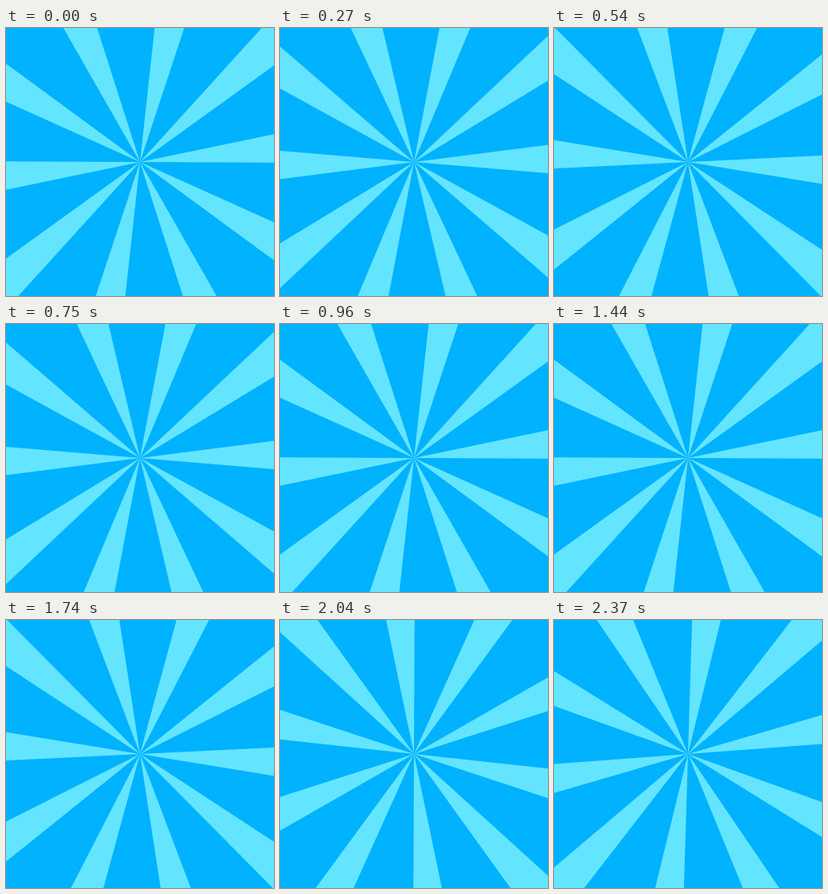
Animation of 336 by 336 pixels, one loop 2.4 s. Source, as an HTML page:

```html
<!DOCTYPE html>
<html lang="en">
<head>
<meta charset="utf-8">
<title>Sunburst</title>
<style>
  html, body { margin: 0; width: 100%; height: 100%; overflow: hidden; background: #00b2ff; }
  svg { display: block; width: 100%; height: 100%; }
</style>
</head>
<body>
<svg viewBox="0 0 336 336">
  <filter id="soft" filterUnits="userSpaceOnUse" x="-8" y="-8" width="352" height="352" color-interpolation-filters="sRGB">
    <feGaussianBlur stdDeviation="0.55"/>
  </filter>
  <rect width="336" height="336" fill="#00b2ff"/>
  <g filter="url(#soft)">
    <path id="rays" fill="#64e5ff"/>
  </g>
</svg>
<script>
  const CENTER = 168, RADIUS = 260;
  const COUNT = 10, WIDTH = 12, GAP = 360 / COUNT;
  const LOOP = 2400, STEP_MS = 30, STEP_DEG = 4.5, START_DEG = 0.25;
  const rays = document.getElementById('rays');

  function rim(deg) {
    const a = deg * Math.PI / 180;
    const x = CENTER + RADIUS * Math.cos(a);
    const y = CENTER + RADIUS * Math.sin(a);
    return x.toFixed(3) + ' ' + y.toFixed(3);
  }

  function draw(ms) {
    const turn = START_DEG + Math.floor((ms % LOOP) / STEP_MS) * STEP_DEG;
    let d = '';
    for (let i = 0; i < COUNT; i++) {
      const end = turn + i * GAP;
      d += `M${CENTER} ${CENTER}L${rim(end - WIDTH)}L${rim(end)}Z`;
    }
    rays.setAttribute('d', d);
  }

  const start = performance.now();
  function tick() {
    draw(performance.now() - start);
    requestAnimationFrame(tick);
  }
  tick();
</script>
</body>
</html>
```
